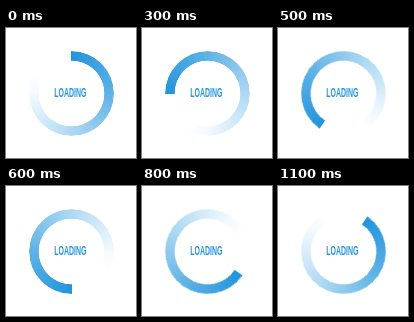
An HTML page that plays this animation: 130x130 px, repeating every 1200 ms.

```html
<!DOCTYPE html>
<html lang="en">
<head>
<meta charset="utf-8">
<title>Loading</title>
<style>
  html, body {
    margin: 0;
    width: 100%;
    height: 100%;
    overflow: hidden;
    background: #fff;
  }
  .ring {
    --hole: radial-gradient(circle, transparent 32.5px, #000 33.1px);
    position: absolute;
    left: 23px;
    top: 23px;
    width: 85px;
    height: 85px;
    border-radius: 50%;
    background: conic-gradient(#2394dc, #5fb2e6 90deg, #aed9f3 180deg, #f4fafe 270deg, #fff 300deg);
    -webkit-mask: var(--hole);
    mask: var(--hole);
    animation:
      quarters 1200ms steps(4, end) infinite,
      ticks 300ms step-end infinite;
  }
  /* Four quarter turns, each made of three uneven ticks */
  @keyframes quarters {
    from { rotate: 0deg; }
    to { rotate: -360deg; }
  }
  @keyframes ticks {
    0% { transform: rotate(0deg); }
    33.333% { transform: rotate(-25deg); }
    66.666% { transform: rotate(-55deg); }
  }
  svg {
    position: absolute;
    left: 0;
    top: 0;
  }
  /* Narrow capitals in the manner of a condensed face */
  text {
    font: bold 12px "Liberation Sans", Arial, sans-serif;
    fill: #2394dc;
    text-anchor: middle;
  }
</style>
</head>
<body>
<div class="ring"></div>
<svg width="130" height="130" viewBox="0 0 130 130">
  <text transform="translate(64.3 69) scale(.58 1)">LOADING</text>
</svg>
</body>
</html>
```
